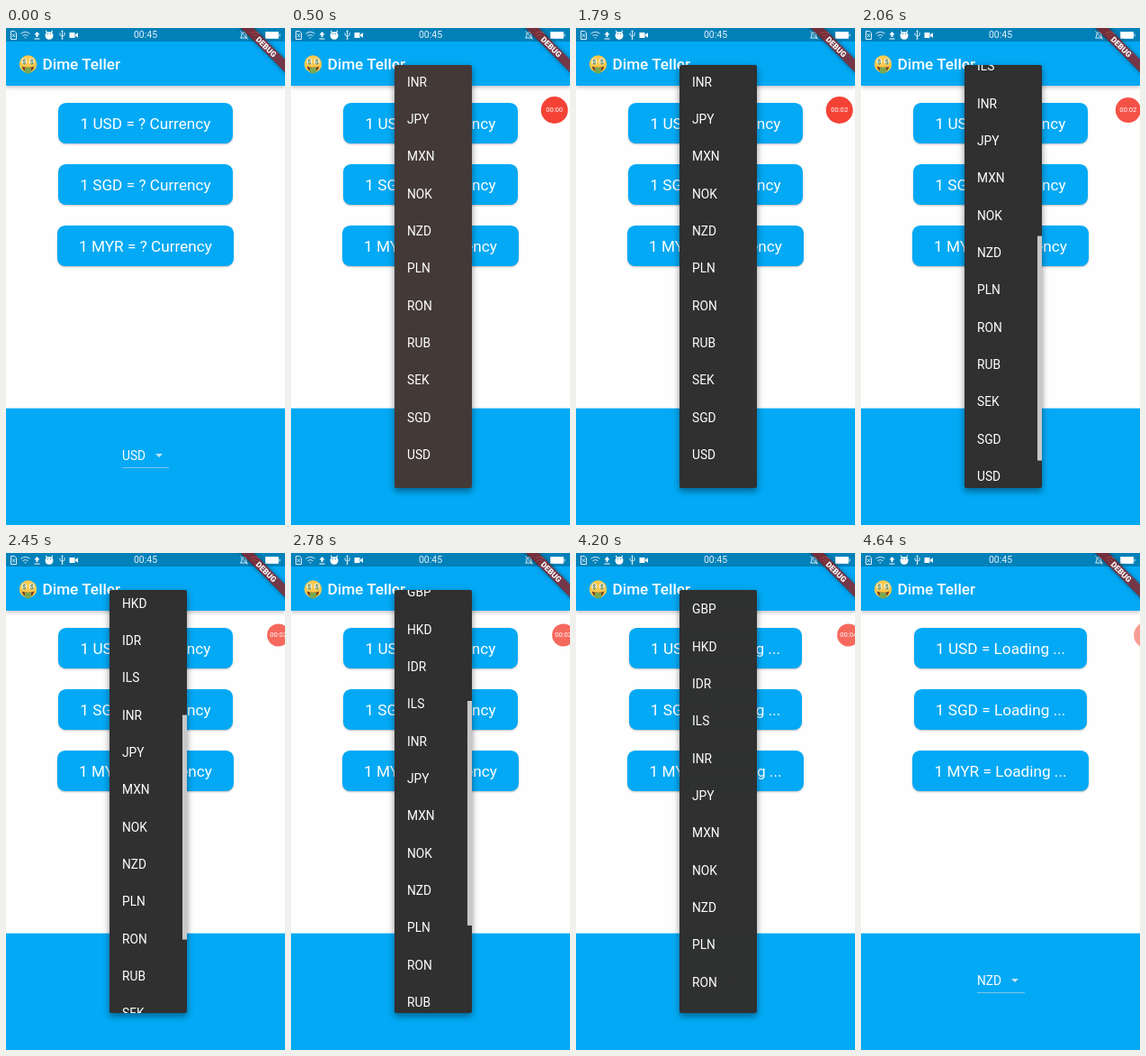
These frames come from a looping animation (310x551 px, 8000 ms). An HTML page:

```html
<!DOCTYPE html>
<html lang="en">
<head>
<meta charset="utf-8">
<title>Currency picker</title>
<style>
html, body { margin: 0; width: 100%; height: 100%; overflow: hidden; background: #fff; }
body { font: 13.78px/20px Roboto, sans-serif; color: #fff; }
#stage, #stage > * { position: absolute; white-space: nowrap; }
#stage { left: 0; top: 0; width: 310px; height: 551px; overflow: hidden; background: #fefefe; }
#bar { left: 0; top: 0; width: 310px; height: 64px; background: #03a9f4; box-shadow: 0 2px 4px rgba(0,0,0,.22); }
#status { left: 0; top: 0; width: 310px; height: 15px; background: #0281b9; }
#clock { left: 0; top: 0; width: 310px; font-size: 10.5px; line-height: 16px; text-align: center; color: #e4f2f9; }
#title { left: 40.5px; top: 30px; font-size: 17.22px; font-weight: 500; }
#cards { left: 0; top: 83px; width: 310px; text-align: center; }
.card { width: max-content; height: 45px; margin: 0 auto 23px; padding: 0 24.1px; border-radius: 8.6px;
  background: #03a9f4; box-shadow: 0 1px 2px rgba(0,0,0,.26); font-size: 17.22px; line-height: 46px; }
#panel { left: 0; top: 421px; width: 310px; height: 129px; border-top: 1px solid #a0dcfa; background: #03a9f4; }
#picker { left: 129px; top: 464px; height: 23px; padding-right: 26px; border-bottom: 1px solid #7fc4e6; }
#picker::after { content: ""; position: absolute; right: 7px; top: 8px; border: solid transparent;
  border-width: 4.3px 4.3px 0; border-top-color: #c5e5f5; }
#menu { left: 115px; width: 86px; overflow: hidden; border-radius: 2px;
  box-shadow: 0 4px 6px rgba(0,0,0,.25), 0 2px 9px rgba(0,0,0,.22); }
#list, #thumb { position: absolute; top: 0; }
#list { left: 14px; line-height: 41.35px; white-space: pre; }
#thumb { right: 0; width: 5px; height: 249px; background: #c8c8c8; }
#rec { left: -15px; top: 75.7px; width: 30px; height: 30px; border-radius: 50%; background: #f44336; }
#timer { font-size: 7.6px; line-height: 12px; top: 85px; transform: translateX(-50%); }
#debug { left: 244.3px; top: 15.5px; width: 90px; height: 10.4px; transform: rotate(45deg);
  background: linear-gradient(#b71c1ca0, #b71c1ca0), #0006; box-shadow: 0 0 5px rgba(0,0,0,.45);
  font-size: 8.78px; line-height: 10.8px; font-weight: 900; text-align: center; }
</style>
</head>
<body>
<div id="stage">
  <div id="bar"></div>
  <div id="status"></div>
  <div id="clock">00:45</div>
  <svg width="310" height="64" fill="none" stroke="#d9edf7">
    <path d="M5.5 3.5h4l2 2v7h-6zM7 6.5l3 3.5m0-3.5L7 10"/>
    <path id="wifi" d="M16.5 6.3q5-3.8 10 0M18.5 8.6q3-2.2 6 0M20.6 10.8h1.8"/>
    <path d="M34.5 4l3 3.6h-2v2.4h-2V7.6h-2zM31.5 11.5h6v1h-6z" fill="#fff" stroke="none"/>
    <path d="M43.5 7.5a4.7 4.7 0 0 1 9 0q0 5.3-4.5 5.3t-4.5-5.3zM44 2l2 2.3-1.5 1.2zM52 2l-2 2.3 1.5 1.2z" fill="#fff" stroke="none"/>
    <path d="M46 6.5h1m2 0h1" stroke="#0281b9"/>
    <path d="M62.5 2.5v10M60 5.5v2.3l2.5 1.8L65 8V5M61.5 3.5h2M61.5 12h2"/>
    <path d="M70.5 5h6v6h-6zM77 7.2l3-2v5.6l-3-2z" fill="#fff" stroke="none"/>
    <path d="M260.5 11h7.5l-1.2-1.8V6.7a2.6 2.6 0 0 0-5 0v2.5zM260.5 3.5l8 9"/>
    <use href="#wifi" x="255"/>
    <path d="M288.5 4.5h14v7h-14z" fill="#fff"/>
    <path d="M304 6.5v3"/>
    <g stroke="none">
      <circle cx="24.5" cy="40" r="9.7" fill="#fbc94c"/>
      <path d="M17.7 42.5q6.8 2.6 13.6 0-.8 6-6.8 6t-6.8-6z" fill="#7a4524"/>
      <path d="M21 44h7v5.5q-3.5 2-7 0z" fill="#79a852"/>
      <ellipse cx="20.3" cy="37" rx="3" ry="3.6" fill="#eef0dc"/>
      <ellipse cx="28.7" cy="37" rx="3" ry="3.6" fill="#eef0dc"/>
      <g font-family="Roboto, sans-serif" font-size="7" font-weight="700" text-anchor="middle" fill="#5b7d46">
        <text x="20.3" y="39.5">$</text><text x="28.7" y="39.5">$</text>
      </g>
    </g>
  </svg>
  <div id="title">Dime Teller</div>
  <div id="cards"></div>
  <div id="panel"></div>
  <div id="picker"></div>
  <div id="menu"><div id="list"></div><div id="thumb"></div></div>
  <div id="rec"></div>
  <div id="timer"></div>
  <div id="debug">DEBUG</div>
</div>
<script>
const LOOP = 8000, OPEN = 430, CHOOSE = 4200;
const TOP = 41, BOTTOM = 510, LIST_TOP = -167;
const $ = id => document.getElementById(id);

// Progress from 0 to 1 between two times, linear or eased.
const ramp = (t, from, to) => Math.min(1, Math.max(0, (t - from) / (to - from)));
const ease = (t, from, to) => {
  const u = ramp(t, from, to);
  return u * u * (3 - 2 * u);
};

const codes = ["USD", "SGD", "MYR"];
$("list").textContent = "EUR GBP HKD IDR ILS INR JPY MXN NOK NZD PLN RON RUB SEK SGD USD".replaceAll(" ", "\n");

function drawPage(chosen) {
  const value = chosen ? "Loading ..." : "? Currency";
  $("cards").innerHTML = codes.map(code => `<div class="card">1 ${code} = ${value}</div>`).join("");
  $("picker").textContent = chosen ? "NZD" : "USD";
}

function drawMenu(t) {
  const grow = ramp(t, OPEN, OPEN + 70), fade = ramp(t, CHOOSE, CHOOSE + 200);
  const top = 250 + (TOP - 250) * grow;
  const scroll = 134 * ease(t, 1860, 2600) + 34 * ease(t, 2600, 2990);
  Object.assign($("menu").style, {
    display: t >= OPEN && fade < 1 ? "block" : "none",
    top: top + "px",
    height: 502 + (BOTTOM - 502) * grow - top + "px",
    background: t < 650 ? "#433a38" : "#303030",
    opacity: .6 + .4 * grow - fade
  });
  $("list").style.transform = `translateY(${LIST_TOP + scroll - top}px)`;
  $("thumb").style.transform = `translateY(${243.5 - .533 * scroll - top}px)`;
  $("thumb").style.opacity = ramp(t, 1790, 1900) - ramp(t, 3440, 3700);
}

function drawRecorder(t) {
  const enter = ramp(t, 60, 300), dock = ramp(t, 1790, 2450), leave = ramp(t, CHOOSE, 4640);
  const x = 292.7 + 10 * dock + 15 * leave;
  const scale = .6 + .4 * enter - .16 * dock + .13 * leave;
  $("rec").style.transform = `translateX(${x}px) scale(${scale})`;
  $("rec").style.opacity = enter - .2 * dock - .27 * leave;
  $("timer").style.left = x + "px";
  $("timer").style.opacity = enter - leave;
  $("timer").textContent = "00:0" + Math.floor((t + 210) / 1000);
}

const start = performance.now();
function draw() {
  const t = (performance.now() - start) % LOOP;
  drawPage(t >= CHOOSE);
  drawMenu(t);
  drawRecorder(t);
  requestAnimationFrame(draw);
}
draw();
</script>
</body>
</html>
```
